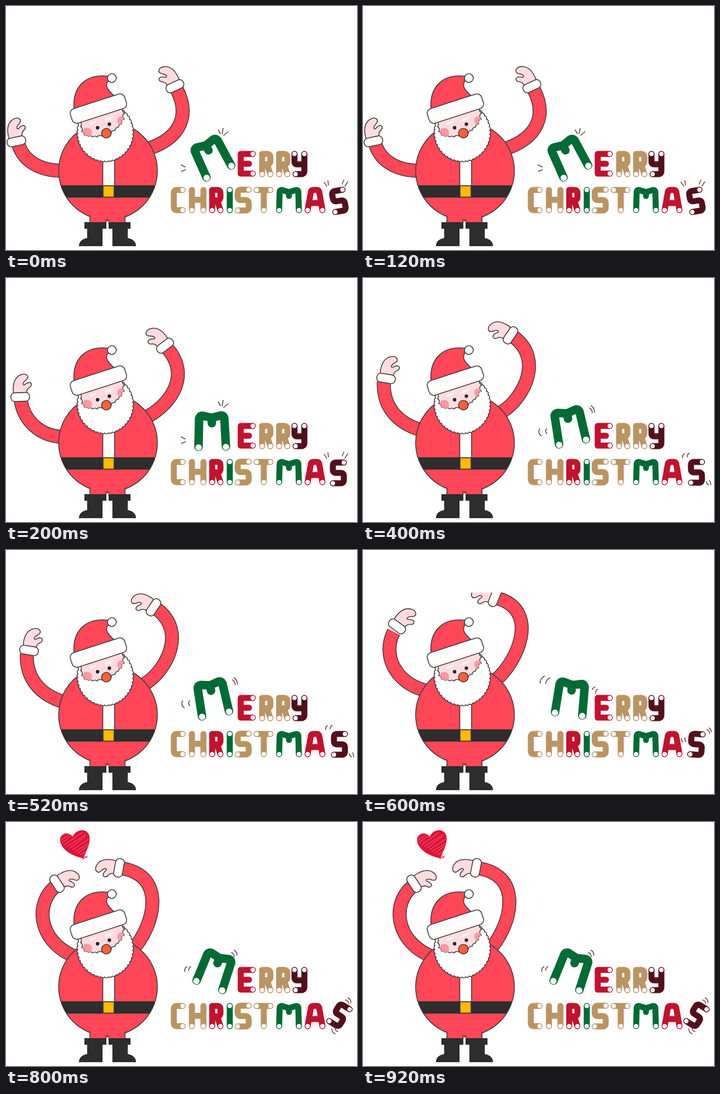
Write an HTML page that moves like this. It is 640 px wide and 447 px high and loops after 1 s.

```html
<!DOCTYPE html>
<html lang="en">
<head>
<meta charset="utf-8">
<title>Merry Christmas</title>
<style>
html, body { margin: 0; width: 100%; height: 100%; overflow: hidden; background: #fff; }
svg { display: block; width: 100%; height: 100%; }
.line { stroke: #463a3a; stroke-width: 1.6; stroke-linejoin: round; }
.letter { fill: none; stroke-linejoin: round; stroke-linecap: round; }
.marks { fill: none; stroke: #70434a; stroke-width: 1.6; stroke-linecap: round; }
</style>
</head>
<body>
<svg id="stage" viewBox="0 0 640 447" role="img" aria-label="Merry Christmas"></svg>
<script>
const RED = '#ff4757', SKIN = '#fddce1', DARK = '#2d2d2d';
const GREEN = '#006b35', CRIMSON = '#c1122f', TAN = '#bb9463', MAROON = '#520f1e';
const STEP = 200;

const path = (d, attrs) => `<path d="${d}" ${attrs}/>`;
const line = (d, fill) => path(d, `class="line" fill="${fill}"`);
const circle = (x, y, r, attrs) => `<circle cx="${x}" cy="${y}" r="${r}" ${attrs}/>`;
const at = (x, y, angle, art) => `<g transform="translate(${x} ${y}) rotate(${angle})">${art}</g>`;

// Arms: path from the shoulder to the wrist, then cuff x, y and angle.
// Letters m and s: x, y and angle.
const poses = [
  { left: ['100,302C65,301 34,287 23,255', 19, 248, -12],
    right: ['264,260C318,240 336,200 311,152', 308, 147, -25],
    m: [388, 303, -26], s: [607, 357, -10] },
  { left: ['100,291C62,288 33,262 27,225', 26, 218, -2],
    right: ['258,254C305,228 335,175 294,129', 290, 124, -37],
    m: [376, 309, -1], s: [606, 357, 0] },
  { left: ['104,278C62,265 36,235 38,190', 42, 184, 9],
    right: ['255,244C292,220 330,150 275,108', 269, 105, -56],
    m: [382, 300, -11], s: [608, 356, 0] },
  { left: ['112,257C55,240 36,190 56,150', 62, 140, 36],
    right: ['240,240C283,205 322,112 247,89', 240, 87, -68],
    m: [375, 300, 7], s: [608, 356, 4], cut: 78 },
  { left: ['118,243C60,215 52,150 90,118', 93, 113, 57],
    right: ['234,230C269,190 294,99 212,85', 206, 84, -79],
    m: [371, 299, 20], s: [608, 354, 32], heart: true }
];

const rays = 'M387,227L391,234M396,224L394,234M405,230L397,237M319,291L327,295M320,303L327,300' +
  'M580,323L585,330M587,320L588,328M613,326L616,319M618,330L623,322';
const marks = [rays, rays,
  'M413,238Q418,241 418,247M416,234Q422,238 422,246M322,276Q318,284 325,289M335,276Q331,280 335,285' +
  'M583,329Q582,324 586,322M591,328Q591,323 595,321M626,373Q627,378 630,379M632,371Q634,375 634,379',
  'M323,244Q323,235 331,231M333,245Q334,237 341,234M418,256Q419,252 423,251M424,263Q424,257 428,255' +
  'M581,345Q580,349 583,352M587,344Q586,348 589,351M627,329Q632,331 632,336M631,326Q635,329 635,333',
  'M326,274Q325,268 330,265M333,272Q333,267 337,265M411,239Q416,241 416,247M416,235Q421,238 421,244' +
  'M619,326Q624,327 625,332M624,322Q629,325 629,331M594,379Q594,385 600,388M600,377Q600,382 605,384'];

function arm([d, x, y, angle], side) {
  const limb = 'M186,302L' + d;
  const thick = (color, w) => path(limb, `fill="none" stroke="${color}" stroke-width="${w}" stroke-linejoin="round"`);
  return thick('#463a3a', 25.5) + thick(RED, 22.5) + at(x, y, angle,
    `<g transform="scale(${side} 1)">` +
    line('M-12,-6C-13,-18 -12,-36 3,-41C13,-44 18,-37 13,-32C10,-29 6,-28 6,-23C8,-19 11,-26 17,-26C23,-26 22,-19 17,-17C14,-15 12,-12 12,-6Z', SKIN) +
    '<rect class="line" x="-17" y="-8" width="34" height="16" rx="7" fill="#fff"/></g>');
}

// Chain of small bumps through the points.
const bumps = (pts, r) => 'M' + pts.map(p => p.join()).join(`A${r},${r} 0 0 1 `);

const BUMPS = 32;
const beard = Array.from({ length: BUMPS + 1 }, (_, i) => {
  const a = (-52 + 254 * i / BUMPS) * Math.PI / 180;
  return [181 + 50 * Math.cos(a), 232 + 52 * Math.sin(a)].map(v => +v.toFixed(1));
});
const face = [[135, 212], [136, 221], [138, 230], [143, 237], [150, 239], [158, 240], [166, 240], [174, 238],
  [183, 236], [192, 232], [199, 228], [205, 222], [211, 216], [216, 207], [217, 196], [214, 186]];

function santa() {
  const leg = line('M153,384V397H182Q182,393 186,393', RED) +
    path('M143,396H183V408H176V440H133Q133,428 148,425V408H143Z', `fill="${DARK}"`);
  return '<clipPath id="belly"><circle cx="186" cy="302" r="90"/></clipPath>' +
    circle(186, 302, 90, `fill="${RED}"`) +
    '<rect class="line" x="176.5" y="270" width="21.5" height="60" fill="#fff"/>' +
    `<rect x="90" y="328.5" width="192" height="22.5" fill="${DARK}" clip-path="url(#belly)"/>` +
    '<rect class="line" x="177" y="329.5" width="20" height="20.5" fill="#ffbc05"/>' +
    circle(186, 302, 90, 'class="line" fill="none"') +
    leg + `<g transform="matrix(-1 0 0 1 370 0)">${leg}</g>` +
    line(bumps(beard, 4.4), '#fff') +
    `<clipPath id="face">${path(bumps(face, 6), '')}</clipPath>` +
    line(bumps(face, 6), SKIN) +
    '<g clip-path="url(#face)" fill="#fb9aa5">' + circle(148, 232, 9, '') + circle(211, 210, 8, '') + '</g>' +
    path('M154,216L163,212M182,209L193,204', 'stroke="#fff" stroke-width="3" stroke-linecap="round"') +
    circle(167, 223, 3.2, 'fill="#222"') + circle(188.5, 216.5, 3.2, 'fill="#222"') +
    circle(183, 233, 8.8, 'class="line" fill="#ff6138"') +
    line('M125,196C118,152 142,122 189,129L186,137C180,146 185,154 197,164Z', RED) +
    circle(193, 132, 8, 'class="line" fill="#fff"') +
    at(168.5, 188, -18, '<rect class="line" x="-52" y="-14" width="104" height="28" rx="9" fill="#fff"/>');
}

// One letter: thick stroke with white holes at its ends.
const letter = (color, d, holes, w = 11, r = 4) =>
  path(d, `class="letter" stroke="${color}" stroke-width="${w}"`) +
  holes.map(([x, y]) => circle(x, y, r, 'fill="#fff"')).join('');

const bigM = letter(GREEN, 'M-25,0L-23,-52Q-22,-57 -17,-57L0,-53L17,-57Q22,-57 23,-52L25,0M0,-52V-43',
  [[-25, 1], [25, 1]], 15.5, 5.8);
const letterR = color => letter(color, 'M0,37V0H9Q15,0 15,6V13Q15,19 9,19H0M9,19L15,37', [[0, 37], [15, 37]]);
const letterS = color => letter(color, 'M10,-19H-4Q-10,-19 -10,-13V-6Q-10,0 -4,0H4Q10,0 10,6V13Q10,19 4,19H-10', [[10, -19], [-10, 19]]);

function words() {
  return letter(CRIMSON, 'M450,271H428V307H450M428,289H443', [[450, 271], [450, 307]]) +
    at(467, 271, 0, letterR(TAN)) + at(498, 271, 0, letterR(TAN)) +
    letter(MAROON, 'M526,271V285Q526,290 531,290H543M544,271V302Q544,308 538,308H528', [[526, 271], [544, 271], [528, 308]]) +
    letter(TAN, 'M322,337H311Q306,337 306,343V368Q306,374 311,374H322', [[322, 337], [322, 374]]) +
    letter(TAN, 'M339,337V374M360,337V374M339,355H360', [[339, 374], [360, 374]]) +
    at(376, 337, 0, letterR(CRIMSON)) +
    letter(GREEN, 'M408,337V374', [[408, 337], [408, 374]]) +
    at(432.5, 355.5, 0, letterS(TAN)) +
    letter(TAN, 'M457,337H482M470,337V374', [[457, 337], [482, 337], [470, 374]]) +
    letter(GREEN, 'M498,374L499,341Q499,337 503,337L516,341L529,337Q533,337 533,341L534,374M516,341V348', [[498, 374], [534, 374]]) +
    letter(CRIMSON, 'M550,374L556,340Q557,337 560,337H567Q570,337 571,340L577,374M553,361H573', [[550, 374], [577, 374]]);
}

function heart() {
  const shape = 'M141,66C120,62 100,50 99,33C99,19 116,18 122,28C126,13 150,10 152,28C153,43 145,54 141,66Z';
  let hatch = '';
  for (let i = 0; i < 14; i++) hatch += `M${86 + i * 5},${30 + i * 3}L${120 + i * 4 + i % 3 * 3},${3 + i * 4}`;
  return `<clipPath id="love">${path(shape, '')}</clipPath>` +
    path(shape, 'fill="#df1437" stroke="#df1437" stroke-width="1"') +
    path(hatch, 'stroke="#fff" stroke-opacity=".5" stroke-width=".8" clip-path="url(#love)"') +
    path('M134,62L148,64L139,68', 'fill="none" stroke="#df1437" stroke-width="1.2"');
}

const still = santa() + words();
const scene = (p, i) =>
  arm(p.left, 1) + arm(p.right, -1) +
  (p.cut ? `<rect width="640" height="${p.cut}" fill="#fff"/>` : '') +
  still + at(...p.m, bigM) + at(...p.s, letterS(MAROON)) +
  path(marks[i], 'class="marks"') + (p.heart ? heart() : '');

const stage = document.getElementById('stage');
let shown = -1;
function draw(now) {
  const i = Math.floor(now / STEP) % poses.length;
  if (i !== shown) stage.innerHTML = scene(poses[shown = i], i);
}
const start = performance.now();
function tick() {
  draw(performance.now() - start);
  requestAnimationFrame(tick);
}
tick();
</script>
</body>
</html>
```
